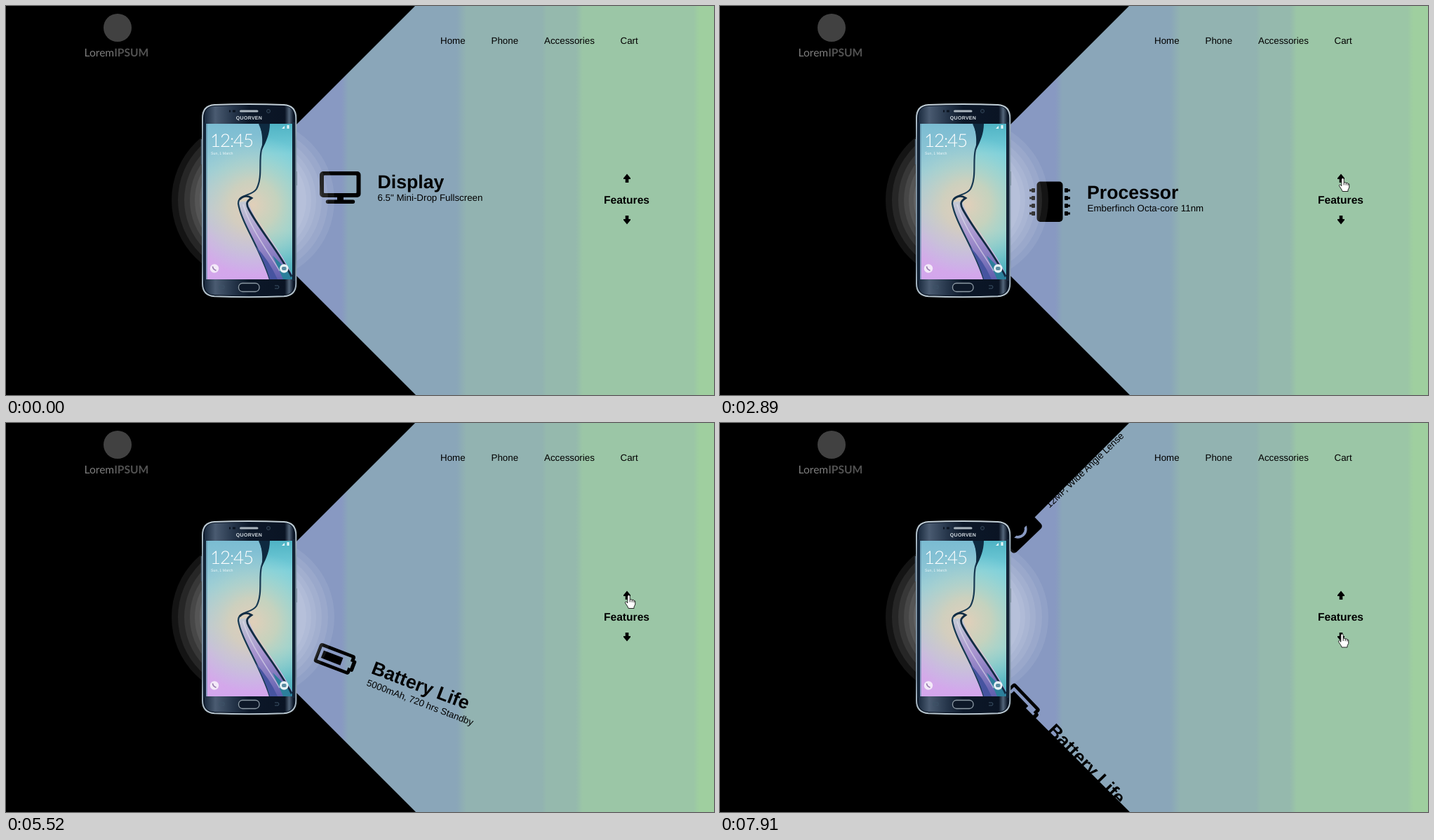
Write an HTML page that moves like this. It is 1009 px wide and 555 px high and loops after 8 s.

```html
<!DOCTYPE html>
<html lang="en">
<head>
<meta charset="utf-8">
<title>Phone features</title>
<style>
  html, body { margin: 0; width: 100%; height: 100%; overflow: hidden; background: #000; }
  svg { display: block; width: 100%; height: 100%; }
  text { font-family: "Liberation Sans", Arial, sans-serif; white-space: pre; text-rendering: geometricPrecision; }
  .nav, .sub { font-size: 13.33px; }
  .head { font-size: 26.67px; font-weight: bold; }
  .label { font-size: 15.6px; font-weight: bold; }
  .logo { font-family: Lato, sans-serif; font-size: 15.6px; }
  .clock { font-family: Lato, "Open Sans", sans-serif; font-weight: 300; letter-spacing: -1.1px; }
</style>
</head>
<body>
<svg viewBox="0 0 1009 555">
  <defs>
    <linearGradient id="sky" gradientUnits="userSpaceOnUse" x1="306" y1="0" x2="1009" y2="0"></linearGradient>
    <linearGradient id="bar" x1="0" y1="0" x2="1" y2="0">
      <stop offset="0" stop-color="#1b2b3f"/>
      <stop offset=".12" stop-color="#4a5b71"/>
      <stop offset=".32" stop-color="#26364b"/>
      <stop offset=".5" stop-color="#0c1829"/>
      <stop offset=".9" stop-color="#0a1424"/>
      <stop offset=".95" stop-color="#53657a"/>
      <stop offset="1" stop-color="#0a1424"/>
    </linearGradient>
    <linearGradient id="rim" x1="0" y1="0" x2="0" y2="1">
      <stop offset="0" stop-color="#c3d0d8"/>
      <stop offset=".2" stop-color="#8499a8"/>
      <stop offset=".8" stop-color="#74889a"/>
      <stop offset="1" stop-color="#b9c7d0"/>
    </linearGradient>
    <linearGradient id="wall" x1="0" y1="0" x2="0" y2="1">
      <stop offset="0" stop-color="#7bbcd2"/>
      <stop offset=".3" stop-color="#95c9d6"/>
      <stop offset=".55" stop-color="#c4bcd6"/>
      <stop offset=".72" stop-color="#d6ace6"/>
      <stop offset="1" stop-color="#d3a6ec"/>
    </linearGradient>
    <linearGradient id="sea" x1="0" y1="0" x2="0" y2="1">
      <stop offset="0" stop-color="#4fb3c4"/>
      <stop offset=".2" stop-color="#78cfdb"/>
      <stop offset=".7" stop-color="#86cfd2"/>
      <stop offset="1" stop-color="#4cb0bd"/>
    </linearGradient>
    <linearGradient id="fold" x1="0" y1="0" x2="0" y2="1">
      <stop offset="0" stop-color="#c4cbd4"/>
      <stop offset=".45" stop-color="#a793cf"/>
      <stop offset="1" stop-color="#5f5fae"/>
    </linearGradient>
    <radialGradient id="warm" gradientUnits="userSpaceOnUse" cx="352" cy="284" r="100">
      <stop offset="0" stop-color="#e6cfb8" stop-opacity=".95"/>
      <stop offset=".35" stop-color="#d5d3b8" stop-opacity=".8"/>
      <stop offset=".65" stop-color="#bcd8c8" stop-opacity=".5"/>
      <stop offset="1" stop-color="#a8dcdc" stop-opacity="0"/>
    </radialGradient>
    <clipPath id="screen"><rect x="285" y="168" width="123" height="222"/></clipPath>
  </defs>

  <rect width="1009" height="555"/>
  <path d="M306 277L583 0H1009V555H584Z" fill="url(#sky)"/>

  <g id="wheel">
    <g>
      <path fill-rule="evenodd" d="M452 236H500.500a5 5 0 0 1 5 5V268a5 5 0 0 1-5 5H452a5 5 0 0 1-5-5V241a5 5 0 0 1 5-5ZM454 241.500a1 1 0 0 0-1 1V266a1 1 0 0 0 1 1H498.500a1 1 0 0 0 1-1V242.500a1 1 0 0 0-1-1Z"/>
      <path d="M472 273H481V276.500H494.500a2.700 2.700 0 0 1 0 5.400H458.500a2.700 2.700 0 0 1 0-5.400H472Z"/>
      <text class="head" x="529.500" y="259.500">Display</text>
      <text class="sub" x="529.500" y="278">6.5" Mini-Drop Fullscreen</text>
    </g>
    <g>
      <rect x="451.500" y="250.500" width="37" height="57.500" rx="5"/>
      <g id="pins"></g>
      <text class="head" x="523" y="274.500">Processor</text>
      <text class="sub" x="523.500" y="293">Emberfinch Octa-core 11nm</text>
    </g>
    <g>
      <path fill-rule="evenodd" d="M455 246.500H464L467 241Q468 239.500 470 239.500H487Q489 239.500 490 241L493 246.500H503a5 5 0 0 1 5 5V285.500a5 5 0 0 1-5 5H455a5 5 0 0 1-5-5V251.500a5 5 0 0 1 5-5ZM465.500 268a13.300 13.300 0 0 0 26.600 0a13.300 13.300 0 0 0-26.600 0Z"/>
      <circle cx="478.800" cy="268" r="9.600"/>
      <text class="head" x="532" y="259.500">Camera</text>
      <text class="sub" x="532" y="278">12MP, Wide Angle Lense</text>
    </g>
    <g>
      <path fill-rule="evenodd" d="M455.500 260H502a4 4 0 0 1 4 4V266.500H507a2.500 2.500 0 0 1 2.500 2.500V281a2.500 2.500 0 0 1-2.500 2.500H506V285.500a4 4 0 0 1-4 4H455.500a4 4 0 0 1-4-4V264a4 4 0 0 1 4-4ZM456 264.800V284.700H501V279.500H504V270H501V264.800Z"/>
      <rect x="460" y="269" width="29.500" height="11.500"/>
      <text class="head" x="533.500" y="275.500">Battery Life</text>
      <text class="sub" x="534" y="294">5000mAh, 720 hrs Standby</text>
    </g>
  </g>

  <g id="glow" fill="#fff"></g>

  <g id="phone">
    <rect x="277.800" y="190" width="2" height="36" fill="#49596a"/>
    <rect x="413.200" y="236" width="1.800" height="20" fill="#7d8d9a"/>
    <path d="M280 160Q280 142 297 141Q346 138.800 396 141Q413.300 142 413.300 160V396Q413.300 413 396 414.300Q346 416 297 414.300Q280 413 280 396Z" fill="#0b1626" stroke="url(#rim)" stroke-width="2"/>
    <path d="M283 168V157Q283 144 297 143Q346 141 397 143Q410 144 410 157V168Z" fill="url(#bar)"/>
    <path d="M283 390H410V398Q410 411 397 412Q346 414 297 412Q283 411 283 398Z" fill="url(#bar)"/>
    <path d="M283.200 166V392M410.200 166V392" stroke="#14263a" stroke-width="2.500"/>
    <rect x="333" y="148.500" width="26.500" height="3" rx="1.500" fill="#a9b4bd"/>
    <circle cx="374" cy="150" r="2.500" fill="#101b2a" stroke="#33475b"/>
    <path d="M318 150h2m3 0h4" stroke="#0c1522" stroke-width="3"/>
    <text x="346.500" y="161.500" text-anchor="middle" font-size="7" font-weight="bold" letter-spacing=".3" fill="#d5dde3">QUORVEN</text>
    <rect x="331.500" y="395.500" width="29.500" height="12" rx="5.500" fill="#0d1828" stroke="#8d9aa5" stroke-width="1.300"/>
    <path d="M304 399h7v4h-7ZM383 399h5q2 2 0 4h-5" fill="none" stroke="#3c5266"/>

    <g clip-path="url(#screen)">
      <rect x="285" y="168" width="123" height="222" fill="url(#wall)"/>
      <path d="M368 168H408V384C392 350 363 315 345 278C366 262 364 242 364 225C364 205 374 190 368 168Z" fill="url(#sea)"/>
      <rect x="285" y="168" width="123" height="222" fill="url(#warm)"/>
      <path d="M331 280C334 312 365 350 377 390H408V384C388 350 358 318 345 278Z" fill="url(#fold)"/>
      <path d="M380 356L408 384V390H395Z" fill="#2c7f9b"/>
      <path d="M361 168C367 180 369 193 364 205C360 222 366 244 357 261C350 272 331 268 331 282C335 308 362 346 376 390" fill="none" stroke="#173a52" stroke-width="2.200"/>
      <path d="M361 168H376C376 182 371 193 365 205C366 190 365 180 361 168Z" fill="#0e2a40"/>
      <path d="M333 276Q341 268 350 274C344 278 341 281 346 290C362 320 390 352 407 386" fill="none" stroke="#122c43" stroke-width="2.800"/>
      <path d="M338 283C347 315 372 348 390 378" fill="none" stroke="#e3e2ee" stroke-width="1.600" opacity=".6"/>
      <path d="M355 342Q369 365 376 390H387Q375 363 355 342Z" fill="#4654a0"/>
      <path d="M286 168V390" stroke="#5f8fa9" stroke-width="2" opacity=".6"/>
    </g>
    <text class="clock" x="291" y="201" font-size="26" fill="#fff">12:45</text>
    <text x="292" y="211.500" font-size="5.300" fill="#eef7f9">Sun, 1 March</text>
    <path d="M393 175l4-4v4ZM400.500 170h3v5h-3Z" fill="#e6f5f7"/>
    <circle cx="297" cy="374.500" r="6.200" fill="#f3e9f8"/>
    <path d="M294.500 371.500Q295 376 299.500 377.300" fill="none" stroke="#9a7fb0" stroke-width="1.800"/>
    <circle cx="396.300" cy="374.500" r="6.200" fill="#e8f2f5"/>
    <rect x="393" y="372" width="6.600" height="5" rx="2" fill="#5a8ca2"/>
  </g>

  <circle cx="159" cy="31" r="20" fill="#414141"/>
  <text class="logo" x="111.500" y="72.300" fill="#7c7c7c">Lorem<tspan font-weight="bold" fill="#525252">IPSUM</tspan></text>

  <text class="nav" x="619" y="53.800">Home</text>
  <text class="nav" x="691.500" y="53.800">Phone</text>
  <text class="nav" x="767" y="53.800">Accessories</text>
  <text class="nav" x="875.500" y="53.800">Cart</text>

  <path id="up" d="M885 239.500L890 245.500V247H887.300V252H882.700V247H880V245.500Z"/>
  <use href="#up" transform="matrix(1 0 0 -1 0 551)"/>
  <text class="label" x="852" y="282">Features</text>

  <g fill="#fff" stroke="#111" stroke-width=".9" stroke-linejoin="round">
    <path id="arrow" d="M0 0V15.500L3.600 12.200 6 17.300 8.200 16.400 5.900 11.300H10.800Z"/>
    <g id="hand">
      <path d="M-1.700 1.200Q-1.700-.5 0-.5Q1.700-.5 1.700 1.200V6L3.500 5.600 4.800 6.500 6.500 6.400 7.700 7.500 9.200 8V13L7.500 16.300V18.500H-.5L-1.500 16-4.800 11Q-5.600 9-4 8.700L-1.700 10.800Z"/>
      <path d="M1.700 6V9.500M4.700 6.500V9.700M7.400 7.500V10" fill="none"/>
    </g>
  </g>
</svg>

<script>
const LOOP = 8000, CX = 306.5, CY = 277.5;
const $ = id => document.getElementById(id);

function add(parent, tag, attrs) {
  const el = document.createElementNS("http://www.w3.org/2000/svg", tag);
  for (const key in attrs) el.setAttribute(key, attrs[key]);
  return parent.appendChild(el);
}

// Colour bands: [left, right, colour], softly joined
[[306, 478, "#8899c2"], [488, 642, "#8aa6b9"], [656, 764, "#92b3b1"],
 [770, 812, "#95b9ad"], [822, 980, "#9bc6a6"], [988, 1009, "#9fcf9f"]]
  .forEach(([left, right, color]) => [left, right].forEach(x =>
    add($("sky"), "stop", { offset: (x - 306) / 703, "stop-color": color })));

[116, 107, 98, 90, 83, 76].forEach(r =>
  add($("glow"), "circle", { cx: 352, cy: 277, r, opacity: .078 }));

for (let i = 0; i < 4; i++) {
  const y = 263 + i * 11;
  for (const side of [-1, 1]) {
    const x = 470 + side * 23.5;
    add($("pins"), "rect", { x: x - 2.5, y: y - 3, width: 5, height: 6, rx: 1 });
    add($("pins"), "rect", { x: x + side * 3.5 - 2, y: y - 1.5, width: 4, height: 3 });
  }
}

const ticks = [0, 860, 980, 1130, 1280, 1440, 1590, 1710, 1830, 1950, 2070, 2200, 2320,
  2470, 2620, 2770, 2890, 3440, 3590, 3740, 3890, 4010, 4130, 4250, 4370, 5160, 5280,
  5400, 5520, 5670, 5820, 5970, 6090, 6520, 6670, 6820, 6970, 7120, 7250, 7640, 7760, 7910];

// Quarter turns: [start, direction]
const turns = [[1790, -1], [3313, -1], [5053, -1], [7610, 1]];

// Pointer: [time, x, y, shape]
const pointer = [[860, 998, 413, "arrow"], [980, 949, 333, "arrow"], [1130, 906, 236, "arrow"],
  [1280, 897, 237, "arrow"], [1440, 892.5, 244, "arrow"], [1590, 887.5, 246, "hand"],
  [6520, 881.5, 260.5, "arrow"], [6670, 860.5, 331, "arrow"], [6820, 870, 341, "arrow"],
  [6970, 879, 318, "arrow"], [7120, 885.5, 303, "hand"], [7250, 886.5, 301.5, "hand"]];

const bezier = (a, b, s) => 3 * a * s * (1 - s) ** 2 + 3 * b * s * s * (1 - s) + s ** 3;

// CSS "ease" timing curve
function ease(p) {
  if (p <= 0) return 0;
  if (p >= 1) return 1;
  let lo = 0, hi = 1;
  for (let i = 0; i < 24; i++) {
    const mid = (lo + hi) / 2;
    if (bezier(.25, .25, mid) < p) lo = mid; else hi = mid;
  }
  return bezier(.1, 1, lo);
}

const items = [...$("wheel").children];

function draw(time) {
  const t = ticks.findLast(tick => tick <= time);
  const angle = turns.reduce((sum, [start, dir]) => sum + dir * 90 * ease((t - start) / 1000), 0);
  items.forEach((item, i) =>
    item.setAttribute("transform", `rotate(${angle + 90 * i} ${CX} ${CY})`));

  const spot = pointer.findLast(p => p[0] <= t);
  for (const shape of ["arrow", "hand"]) {
    const shown = spot && spot[3] === shape;
    $(shape).setAttribute("visibility", shown ? "visible" : "hidden");
    if (shown) $(shape).setAttribute("transform", `translate(${spot[1]} ${spot[2]})`);
  }
}

const begin = performance.now();
function frame() {
  draw((performance.now() - begin) % LOOP);
  requestAnimationFrame(frame);
}
frame();
</script>
</body>
</html>
```
